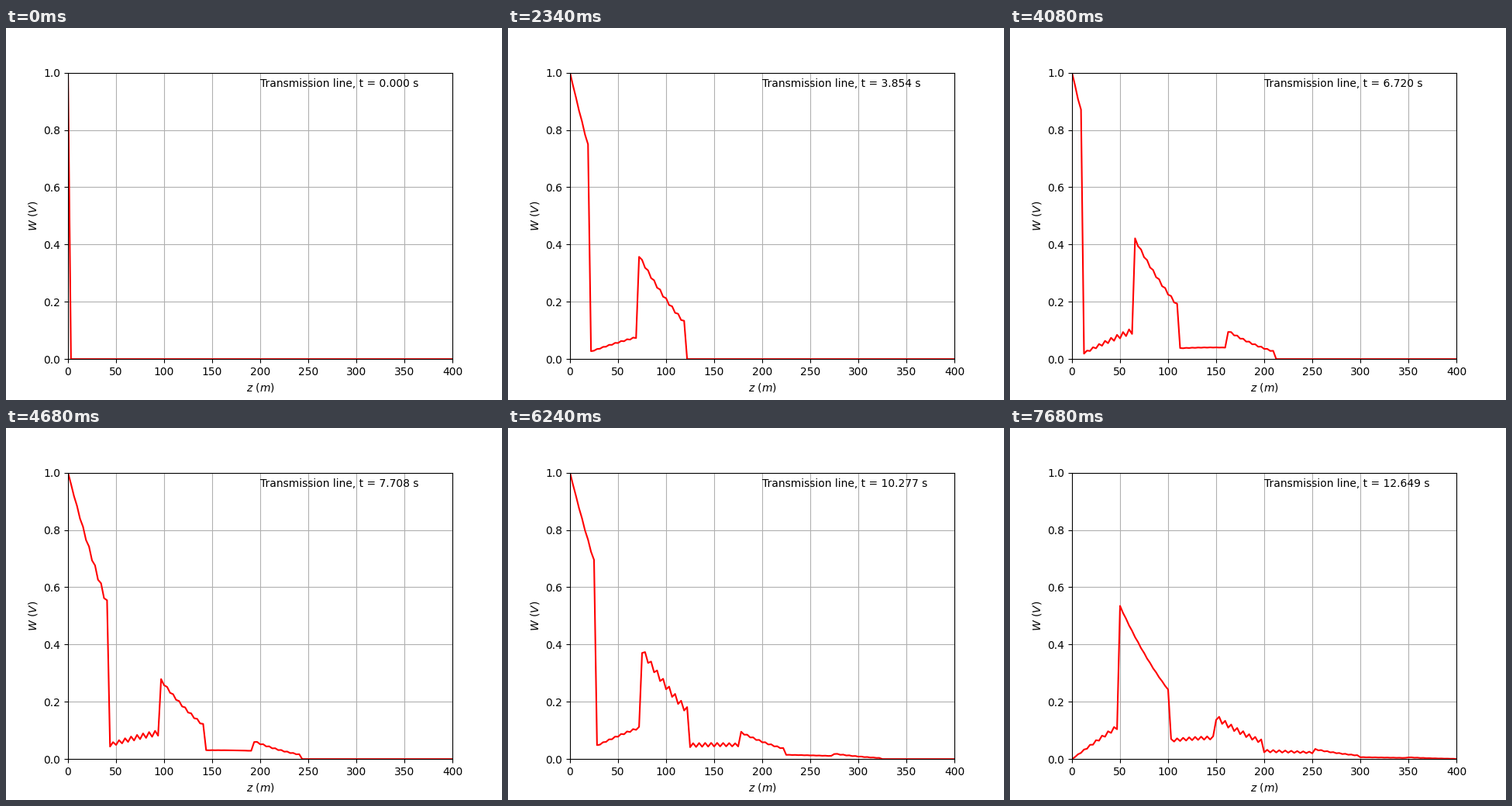
These frames come from a looping animation (640 px wide and 480 px high, 7.74 s). A matplotlib script:

```python
import numpy as np
import matplotlib.pyplot as plt
from matplotlib.animation import FuncAnimation

# Line constants per metre
R, L, G, C = 0.1, 0.1, 0.001, 0.01
LENGTH = 400.0
CELLS = 128
STEPS = 128

z = np.linspace(0, LENGTH, CELLS + 1)
dz = z[1]
dt = dz * np.sqrt(L * C)  # Courant number of one


def source(n):
    """Square wave of 32 steps; the listed steps sit on an edge and count as on."""
    return float(0 < n % 32 < 16 or n in (0, 16, 80, 96, 112))


def solve():
    """Telegraph equation by central differences, starting at rest."""
    damp = 0.5 * (R / L + G / C) * dt
    leak = R * G / (L * C) * dt**2
    w = np.zeros((STEPS + 1, CELLS + 1))
    w[:, 0] = [source(n) for n in range(STEPS + 1)]
    for n in range(1, STEPS):
        now, old = w[n], w[n - 1]
        w[n + 1, 1:-1] = (now[2:] + now[:-2] - (1 - damp) * old[1:-1]
                          - leak * now[1:-1]) / (1 + damp)
    return w


waves = solve()

plt.rcParams["font.family"] = "DejaVu Sans"
fig, ax = plt.subplots(figsize=(6.4, 4.8), dpi=100)
ax.set(xlim=(0, LENGTH), ylim=(0, 1), xlabel=r"$z\ (m)$", ylabel=r"$W\ (V)$")
ax.grid(True)
line, = ax.plot([], [], color="red", lw=1.5)
label = ax.text(200, 0.95, "")


def update(n):
    line.set_data(z, waves[n])
    label.set_text(f"Transmission line, t = {n * dt:.3f} s")
    return line, label


anim = FuncAnimation(fig, update, frames=STEPS + 1, interval=60,
                     repeat=True, repeat_delay=0, blit=False)
plt.show()
```
